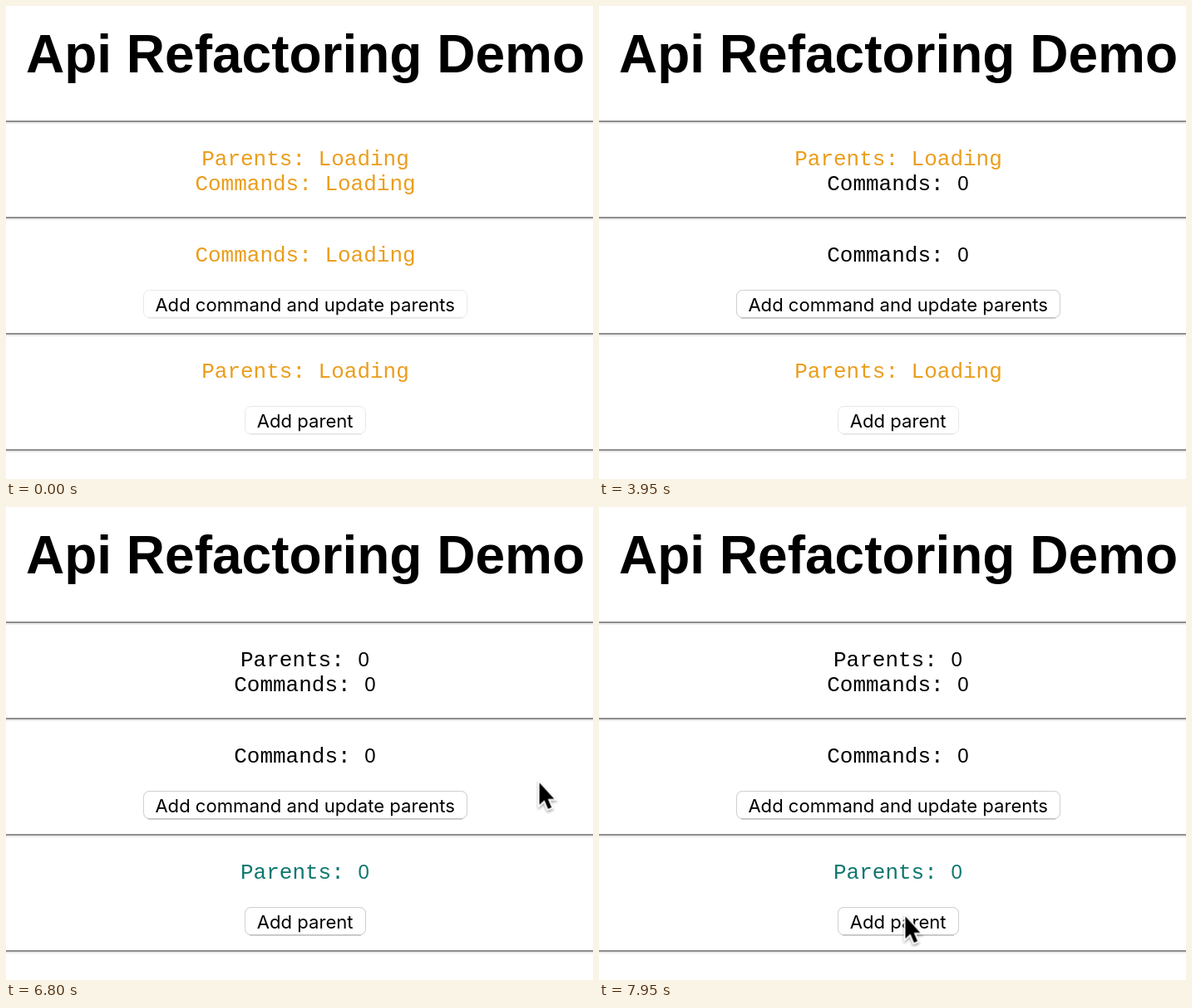
An HTML page for the animation above (8000 ms loop, 706x570 px).

```html
<!DOCTYPE html>
<html lang="en">
<head>
<meta charset="utf-8">
<title>Api Refactoring Demo</title>
<style>
  html, body { margin: 0; width: 100%; height: 100%; overflow: hidden; background: #fff; }
  svg { display: block; width: 706px; height: 570px; }
  text { text-anchor: middle; }
  .title { font: bold 64px "Liberation Sans", Helvetica, Arial, sans-serif; }
  .row { font: 26px "Liberation Mono", "Courier New", monospace; white-space: pre; }
  .zero { font: 24px "Liberation Sans", Arial, sans-serif; }
  .label { font: 22.08px Inter, sans-serif; }
  .loading { fill: #eb9d1c; }
  .changed { fill: #0f776f; }

  .rule-dark { fill: #8e8e8e; }
  .rule-light { fill: #ececec; }
  .face { fill: #fff; stroke: #e8e8e8; stroke-width: 1; }
  .edge { fill: none; stroke: #cfcfcf; stroke-width: 1; }
  .base { fill: none; stroke: #dedede; stroke-width: 1; }
  .base.strong { stroke: #b4b4b4; }

  .commands, .parents, #cursor { animation: 8s step-end infinite; }
  .commands.wait { animation-name: commands-wait; }
  .commands.done { animation-name: commands-done; }
  .parents.wait { animation-name: parents-wait; }
  .parents.done { animation-name: parents-done; }
  @keyframes commands-wait { 0% { opacity: 1 } 16.25%, 100% { opacity: 0 } }
  @keyframes commands-done { 0% { opacity: 0 } 16.25%, 100% { opacity: 1 } }
  @keyframes parents-wait { 0% { opacity: 1 } 75%, 100% { opacity: 0 } }
  @keyframes parents-done { 0% { opacity: 0 } 75%, 100% { opacity: 1 } }

  #cursor { animation-name: appear; }
  #arrow { animation: travel 8s linear infinite; }
  @keyframes appear { 0% { opacity: 0 } 84.375%, 100% { opacity: 1 } }
  @keyframes travel {
    0%, 84.375% { transform: translate(673px, 318px); }
    85% { transform: translate(642px, 332px); }
    86.875% { transform: translate(572px, 371px); }
    88.75% { transform: translate(516px, 405.5px); }
    92% { transform: translate(452px, 441px); }
    95.625% { transform: translate(400px, 470px); }
    98% { transform: translate(376px, 488px); }
    99.375%, 100% { transform: translate(368.5px, 493.5px); }
  }
</style>
</head>
<body>
<svg viewBox="0 0 706 570">
  <defs>
    <g id="rule">
      <rect class="rule-dark" width="706" height="2"/>
      <rect class="rule-light" y="2" width="706" height="2"/>
    </g>
    <filter id="shadow" x="-50%" y="-50%" width="200%" height="200%">
      <feDropShadow dx="0" dy="2" stdDeviation="1.5" flood-opacity=".4"/>
    </filter>
  </defs>

  <text class="title" x="360" y="80">Api Refactoring Demo</text>
  <use href="#rule" y="138"/>
  <use href="#rule" y="254"/>
  <use href="#rule" y="394"/>
  <use href="#rule" y="534"/>

  <g class="row">
    <g class="parents wait loading">
      <text x="360" y="192">Parents: Loading</text>
      <text x="360" y="448">Parents: Loading</text>
    </g>
    <g class="parents done">
      <text x="359.4" y="192">Parents: <tspan class="zero" dx="1">0</tspan></text>
      <text class="changed" x="359.4" y="448">Parents: <tspan class="zero" dx="1">0</tspan></text>
    </g>
    <g class="commands wait loading">
      <text x="360" y="222">Commands: Loading</text>
      <text x="360" y="308">Commands: Loading</text>
    </g>
    <g class="commands done">
      <text x="359.4" y="222">Commands: <tspan class="zero" dx="1">0</tspan></text>
      <text x="359.4" y="308">Commands: <tspan class="zero" dx="1">0</tspan></text>
    </g>
  </g>

  <g>
    <rect class="face" x="165.5" y="342.5" width="389" height="33" rx="7"/>
    <path class="base" d="M171 376H549"/>
    <g class="commands done">
      <rect class="edge" x="165.5" y="342.5" width="389" height="33" rx="7"/>
      <path class="base strong" d="M171 376H549"/>
    </g>
    <text class="label" x="359.7" y="368">Add command and update parents</text>
  </g>
  <g>
    <rect class="face" x="287.5" y="482.5" width="145" height="33" rx="7"/>
    <path class="base" d="M293 516H427"/>
    <g class="parents done">
      <rect class="edge" x="287.5" y="482.5" width="145" height="33" rx="7"/>
      <path class="base strong" d="M293 516H427"/>
    </g>
    <text class="label" x="359.7" y="508">Add parent</text>
  </g>

  <g id="cursor">
    <g id="arrow">
      <path d="M0 0V26.5L6 21L10.4 31.5L14.6 29.8L10.2 19.4H17.8Z" stroke="#fff" stroke-width="3.5"
            paint-order="stroke" filter="url(#shadow)"/>
    </g>
  </g>
</svg>
</body>
</html>
```
